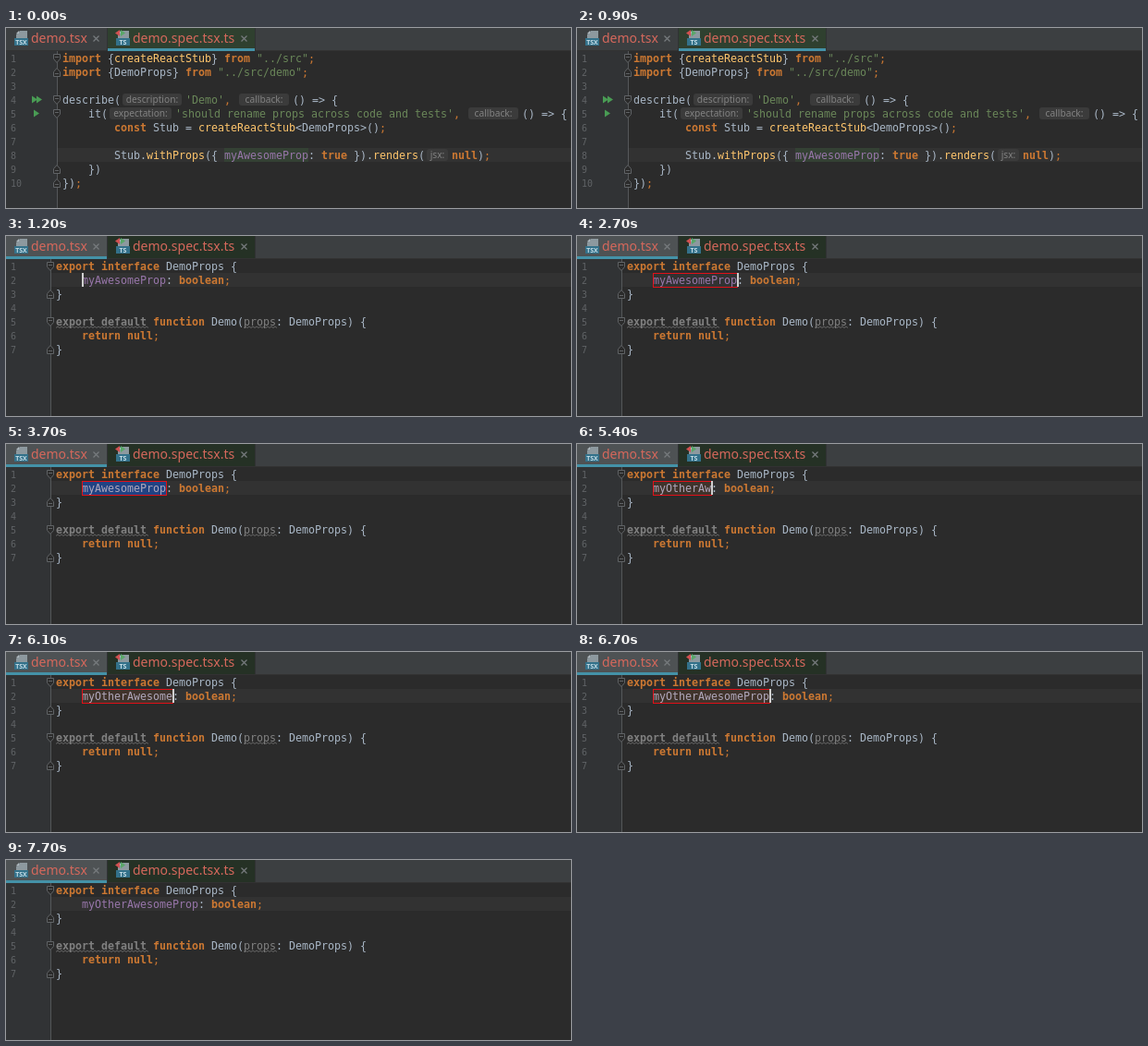
These frames come from a looping animation (611x195 px, 8000 ms). An HTML page:

```html
<!DOCTYPE html>
<html lang="en">
<head>
<meta charset="utf-8">
<title>Rename property</title>
<style>
  html, body { margin: 0; width: 100%; height: 100%; overflow: hidden; background: #2b2b2b; }
  svg { display: block; width: 611px; height: 195px; }
  text { white-space: pre; font: 11.63px "DejaVu Sans Mono", monospace; fill: #a9b7c6; }
  .kw { fill: #cc7832; font-weight: bold; }
  .semi { fill: #cc7832; }
  .fn { fill: #ffc66d; }
  .str { fill: #6a8759; }
  .field { fill: #9876aa; }
  .edit { fill: #b0a8bc; }
  .unused { fill: #808080; }
  .dim { fill: #808080; font-weight: bold; }
  .num { font-size: 10px; fill: #606366; }
  .hint { font: 10.2px "Noto Sans", sans-serif; fill: #828282; text-anchor: middle; }
  .tab { font: 14px "Noto Sans", sans-serif; fill: #d5685c; }
  .badge { font: bold 7px "Noto Sans", sans-serif; fill: #c4dce6; text-anchor: middle; }
  .line { fill: none; stroke: #606366; }
</style>
</head>
<body>
<svg id="stage" viewBox="0 0 611 195"></svg>
<script>
const CHAR = 7, ROW = 15, TOP = 25;
const OLD_NAME = 'myAwesomeProp', NEW_NAME = 'myOtherAwesomeProp';

const rowY = row => TOP + (row - 1) * ROW;
const escapeText = s => s.replace(/&/g, '&amp;').replace(/</g, '&lt;');
const text = (x, y, s, cls = '') => `<text x="${x}" y="${y}" class="${cls}">${escapeText(s)}</text>`;
const rect = (x, y, w, h, fill, extra = '') =>
  `<rect x="${x}" y="${y}" width="${w}" height="${h}" fill="${fill}" ${extra}/>`;
const caret = (x, row) => rect(x, rowY(row), 2, ROW, '#d0d0d0');

// Tokens are [text, class]; a hint also carries the room it takes.
function code(x, row, ...tokens) {
  const y = rowY(row);
  let out = '';
  for (const [s, cls, room] of tokens) {
    if (cls === 'hint') {
      out += rect(x + 2, y + 1, room - 6, 13, '#3b3b3b', 'rx="3"') + text(x + room / 2 - 1, y + 11, s, cls);
      x += room;
      continue;
    }
    const indent = s.length - s.trimStart().length;
    if (s.trim()) out += text(x + indent * CHAR, y + 12, s.trim(), cls);
    x += s.length * CHAR;
  }
  return out;
}

function fold(x, row, end) {
  const flip = end ? -1 : 1;
  return `<g transform="translate(${x},${rowY(row) + 8}) scale(1,${flip})">
    <path d="M-3.5-4.5h7v5l-3.5 4l-3.5-4z" fill="#2b2b2b" stroke="#606366"/>
    <path d="M-2-1.5h4" class="line"/></g>`;
}

function gutter(edge, lines, folds, ends) {
  let out = rect(0, TOP, edge, 170, '#313335') + `<path d="M${edge + .5} ${TOP}V195" class="line" stroke-opacity=".8"/>`;
  for (let n = 1; n <= lines; n++) out += text(5, rowY(n) + 12, String(n), 'num');
  return out + folds.map(r => fold(edge, r, false)).join('') + ends.map(r => fold(edge, r, true)).join('');
}

const arrow = (x, y) => `<path d="M${x} ${y - 4}l6 4l-6 4z" fill="#499c54"/>`;

const cross = x => `<path d="M${x - 3} 8.5l6 6m0-6l-6 6" fill="none" stroke="#777b7e" stroke-width="1.2"/>`;

const fileIcon = (x, label) =>
  `<path d="M${x + 6} 3h8v9h-12v-5z" fill="#8d999f"/><path d="M${x + 2} 6l3-3v3z" fill="#aeb8be"/>`
  + rect(x, 11, 15, 8, '#33718a') + text(x + 7.5, 17.6, label, 'badge');

function tabs(testActive) {
  const [x, w] = testActive ? [110, 159] : [0, 109];
  return rect(0, 0, 611, TOP, '#3c3f41')
    + rect(0, 0, 109, TOP, testActive ? '#3c3f41' : '#4e5254')
    + rect(109, 0, 1, TOP, '#303234')
    + rect(110, 0, 159, TOP, testActive ? '#2f402f' : '#253125')
    + rect(269, 0, 1, TOP, '#303234')
    + rect(0, 24, 611, 1, '#323232')
    + rect(x, 22, w, 3, '#4492a8')
    + fileIcon(9, 'TSX') + text(27, 16, 'demo.tsx', 'tab') + cross(97.5)
    + fileIcon(119, 'TS') + '<path d="M123 2v7l-5-3.5z" fill="#d25252"/><path d="M124 2v7l5-3.5z" fill="#59a869"/>'
    + text(137, 16, 'demo.spec.tsx.ts', 'tab') + cross(257.5);
}

function wave(x, row, chars) {
  const y = rowY(row) + 14.5;
  return `<path d="M${x} ${y}${'l2-1.5l2 1.5'.repeat(Math.round(chars * CHAR / 4))}" fill="none" stroke="#757575" stroke-width=".8"/>`;
}

const semi = [';', 'semi'];

function testFile(caretOn) {
  const x = 61;
  return rect(0, TOP, 611, 170, '#2b2b2b') + rect(55, rowY(8), 556, ROW, '#323232')
    + gutter(55, 10, [1, 4, 5], [2, 9, 10])
    + arrow(28, 77.5) + arrow(33, 77.5) + arrow(30, 92.5)
    + code(x, 1, ['import', 'kw'], [' {'], ['createReactStub', 'fn'], ['} '], ['from', 'kw'], [' "../src"', 'str'], semi)
    + code(x, 2, ['import', 'kw'], [' {DemoProps} '], ['from', 'kw'], [' "../src/demo"', 'str'], semi)
    + code(x, 4, ['describe('], ['description:', 'hint', 70], ["'Demo'", 'str'], [',', 'semi'], [' '],
        ['callback:', 'hint', 60], ['() => {'])
    + code(x, 5, ['    it('], ['expectation:', 'hint', 73], ["'should rename props across code and tests'", 'str'],
        [',', 'semi'], [' '], ['callback:', 'hint', 60], ['() => {'])
    + code(x, 6, ['        const', 'kw'], [' Stub = '], ['createReactStub', 'fn'], ['<DemoProps>()'], semi)
    + rect(236, rowY(8), OLD_NAME.length * CHAR, ROW, '#344134')
    + code(x, 8, ['        Stub.'], ['withProps', 'fn'], ['({ '], [OLD_NAME, 'field'], [': '], ['true', 'kw'], [' }).'],
        ['renders', 'fn'], ['('], ['jsx:', 'hint', 29], ['null', 'kw'], [')'], semi)
    + code(x, 9, ['    })']) + code(x, 10, ['})'], semi)
    + (caretOn ? caret(264, 8) : '') + tabs(true);
}

function sourceFile({ name, cls = 'edit', fill, box, at = -1 }) {
  const x = 54, nameX = x + 4 * CHAR, w = name.length * CHAR;
  return rect(0, TOP, 611, 170, '#2b2b2b') + rect(48, rowY(2), 563, ROW, '#323232')
    + gutter(48, 7, [1, 5], [3, 7])
    + code(x, 1, ['export interface', 'kw'], [' DemoProps {'])
    + (fill ? rect(nameX, rowY(2), w, ROW, fill) : '')
    + code(x, 2, ['    '], [name, cls], [': '], ['boolean', 'kw'], semi)
    + (box ? rect(nameX + .5, rowY(2) + .5, w, ROW, 'none', 'stroke="#e01018"') : '')
    + (at >= 0 ? caret(nameX + at * CHAR, 2) : '')
    + code(x, 3, ['}'])
    + code(x, 5, ['export default', 'dim'], [' function', 'kw'], [' Demo('], ['props', 'unused'], [': DemoProps) {'])
    + wave(x, 5, 14) + wave(x + 29 * CHAR, 5, 5)
    + code(x, 6, ['    return null', 'kw'], semi)
    + code(x, 7, ['}']) + tabs(false);
}

const WRITE = '#40332b', SELECTED = '#214283';
const idle = { name: OLD_NAME, cls: 'field' };
const selected = { name: OLD_NAME, fill: SELECTED, box: true };
const typed = n => ({ name: NEW_NAME.slice(0, n), fill: WRITE, box: true, at: n });
const renamed = { name: NEW_NAME, cls: 'field' };

// Time in ms, then how many letters have been typed.
const keys = [[4000, 1], [4500, 3], [4700, 5], [4800, 6], [4900, 7], [5200, 8], [5400, 9], [5700, 11], [5800, 12],
  [6000, 13], [6100, 14], [6300, 15], [6400, 16], [6500, 17], [6700, 18]];

const steps = [
  [0, () => testFile(false)],
  [400, () => testFile(true)],
  [900, () => testFile(false)],
  ...[
    [1200, { ...idle, at: 0 }],
    [1700, idle],
    [2200, { ...idle, at: 0 }],
    [2700, { ...idle, box: true, at: 13 }],
    [2800, { ...selected, at: 13 }],
    [3700, selected],
    ...keys.map(([t, n]) => [t, typed(n)]),
    [6800, { ...typed(18), box: false }],
    [7100, { ...renamed, at: 18 }],
    [7700, renamed],
  ].map(([t, state]) => [t, () => sourceFile(state)]),
];

const stage = document.getElementById('stage');
const start = performance.now();
let shown;

function tick() {
  const t = (performance.now() - start) % 8000;
  const step = steps.findLast(([from]) => from <= t);
  if (step !== shown) {
    shown = step;
    stage.innerHTML = step[1]();
  }
  requestAnimationFrame(tick);
}
tick();
</script>
</body>
</html>
```
